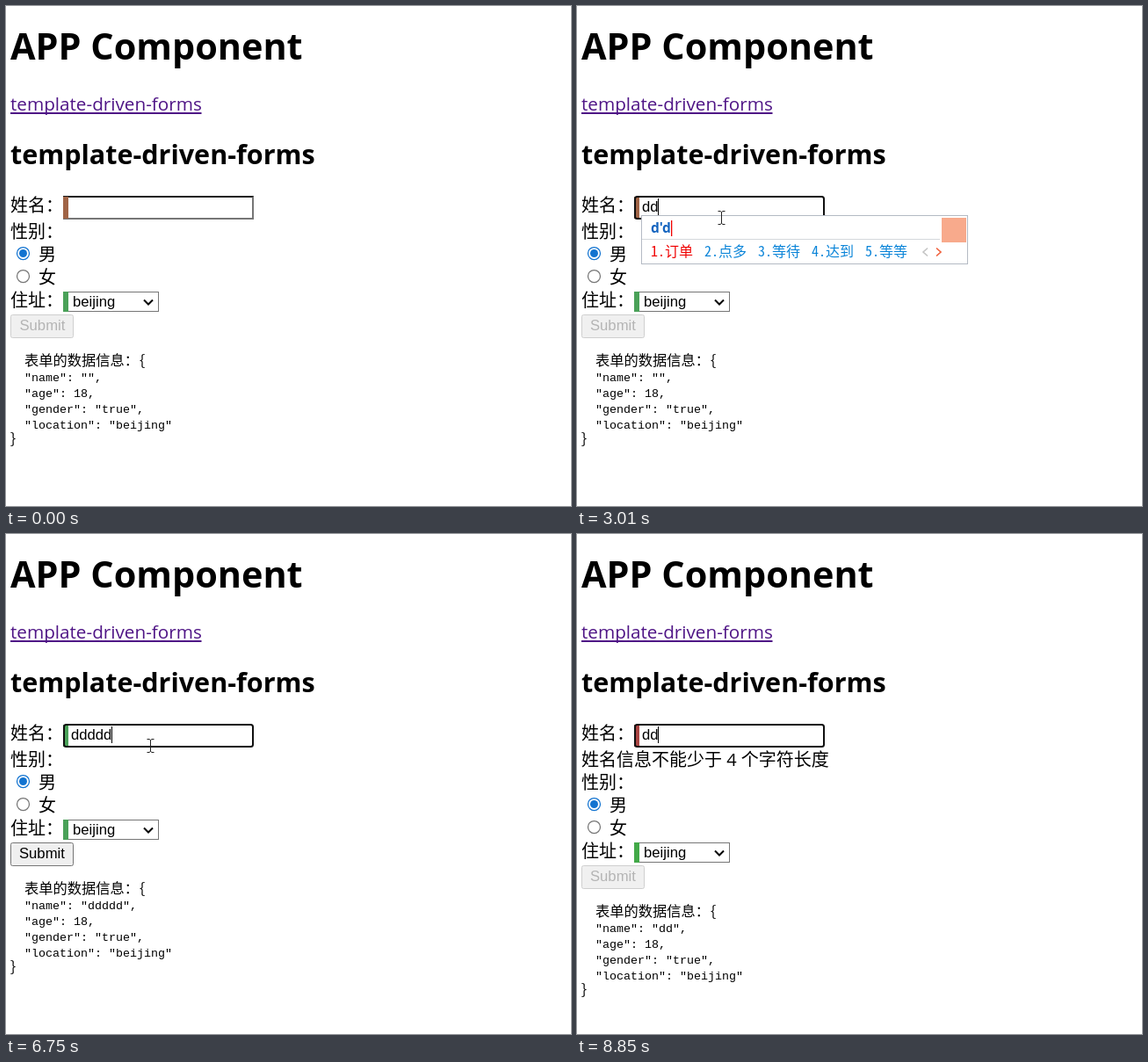
Write an HTML page that moves like this. It is 643 px wide and 569 px high and loops after 9.23 s.

```html
<!DOCTYPE html>
<html lang="zh-CN">
<head>
<meta charset="utf-8">
<title>APP Component</title>
<style>
html, body { margin: 0; width: 100%; height: 100%; overflow: hidden; background: #fff; }
svg { display: block; width: 643px; height: 569px; }
text { white-space: pre; fill: #000; }
.head { font-family: "Open Sans", "Noto Sans", sans-serif; font-weight: 700; }
.link { font: 20.7px "Open Sans", "Noto Sans", sans-serif; fill: #4f1586; }
.label { font: 20px "Open Sans", "Noto Sans CJK SC", "Noto Sans CJK", sans-serif; }
.field { font: 16.67px "Liberation Sans", Arial, sans-serif; }
.mono { font: 13.33px "Liberation Mono", monospace; }
.note { font: 16.25px "Noto Sans Mono CJK SC", "Noto Sans CJK SC", monospace; }
.pick { font: 16px "Noto Sans Mono CJK SC", "Noto Sans CJK SC", monospace; fill: #0a84d8; }
.pick:first-child { fill: #f00000; }
.pinyin { font: 700 15.5px "Open Sans", "Noto Sans", sans-serif; fill: #1464bf; }
.ring { fill: none; stroke-width: 1.25; }
</style>
</head>
<body>
<svg viewBox="0 0 643 569">
  <text class="head" x="5" y="61" font-size="41.4">APP Component</text>
  <text class="link" x="5" y="119">template-driven-forms</text>
  <rect x="5" y="121" width="217.500" height="2" fill="#4f1586"/>
  <text class="head" x="5" y="180" font-size="30.5">template-driven-forms</text>

  <text class="label" x="5" y="234">姓名：</text>
  <g id="idle">
    <path d="M65 216h217v27h-217z" fill="#767676"/>
    <path d="M65 216h217l-2 2h-215z" fill="#1c1c1c"/>
    <path d="M71 218h209v23h-209z" fill="#fff"/>
  </g>
  <rect id="bar" x="65" y="217" width="6" height="25"/>
  <rect id="ring" x="66" y="217" width="215" height="25" rx="2.5" fill="none" stroke="#101010" stroke-width="2"/>
  <text class="field" id="typed" x="74" y="234"></text>
  <rect id="caret" y="219" width="1" height="19"/>
  <text class="label" id="error" x="5" y="264">姓名信息不能少于 4 个字符长度</text>

  <g id="rest">
    <text class="label" x="5" y="264">性别：</text>
    <circle class="ring" cx="19.5" cy="281.5" r="7" stroke="#1273d0"/>
    <circle cx="19.5" cy="281.5" r="4.5" fill="#1273d0"/>
    <text class="label" x="37" y="290">男</text>
    <circle class="ring" cx="19.5" cy="307.5" r="7" stroke="#767676"/>
    <text class="label" x="37" y="316">女</text>
    <text class="label" x="5" y="342">住址：</text>
    <rect x="65.5" y="325.5" width="108" height="22" fill="none" stroke="#767676"/>
    <rect id="selectBar" x="65" y="325" width="6" height="23"/>
    <text class="field" x="76" y="342">beijing</text>
    <path d="M157 334.500l5 5l5-5" fill="none" stroke="#000" stroke-width="2"/>
    <rect id="button" x="5.5" y="351.5" width="71" height="26" rx="2"/>
    <text class="field" id="submit" x="15" y="369">Submit</text>
    <text class="note" x="21" y="409">表单的数据信息：{</text>
    <text class="mono" id="name" x="21" y="427"></text>
    <text class="mono" x="21" y="445">"age": 18,</text>
    <text class="mono" x="21" y="463">"gender": "true",</text>
    <text class="mono" x="21" y="481">"location": "beijing"</text>
    <text class="note" x="4" y="498">}</text>
  </g>

  <g id="ime">
    <rect id="panel" x="73.5" y="238.5" height="55" fill="#fff" stroke="#b4bac4"/>
    <rect id="rule" x="74" y="265" height="1" fill="#d5d8dc"/>
    <text class="pinyin" id="pinyin" x="84" y="258"></text>
    <rect id="redCaret" y="244" width="1.3" height="18" fill="#f00000"/>
    <g id="picks"></g>
    <g id="panelEnd" fill="none" stroke-width="1.6">
      <rect x="-30" y="241" width="28" height="28" fill="#f8aa8c"/>
      <path d="M-46 275.5l-5 4.5l5 4.5" stroke="#c4c4c4"/>
      <path d="M-36 275.5l5 4.5l-5 4.5" stroke="#f0603c"/>
    </g>
  </g>

  <path id="beam" d="M160.5 233.5h2.5l1.5 1l1.5-1h2.5M164.5 234.5v13M160.5 248.5h2.5l1.5-1l1.5 1h2.5" fill="none" stroke="#222"/>
  <path id="arrow" d="M.5.5v16l3.7-3.5l2.5 5.500l2.300-1l-2.500-5.400h5z" fill="#fff" stroke="#000"/>
</svg>
<script>
const LOOP = 9230;
const ui = {};
document.querySelectorAll('[id]').forEach(el => ui[el.id] = el);

// [start, characters typed, right edge of the candidate panel]
const typing = [[0, 0], [2860, 1, 437], [3010, 2, 445], [3160, 3, 525], [3560, 4, 637],
  [3860, 4], [5650, 5], [6890, 4], [7040, 3], [7220, 2]];
const caretOn = [[1140, 1690], [2160, 2690], [2860, 4410], [4960, 5420],
  [5650, 6180], [6750, 7300], [7780, 8310], [8850, LOOP]];
const words = ['', '的 到 都 对 等', '订单 点多 等待 达到 等等',
  '滴滴答 等等等 点点滴 达到的 对等的', '滴答滴答 的点点滴滴 地对地导弹 顶顶顶顶 点点滴滴'];

const set = (el, attrs) => { for (const k in attrs) el.setAttribute(k, attrs[k]); };
const show = (el, on) => { el.style.display = on ? '' : 'none'; };
const curve = (a, b, c, u) => a * (1 - u) ** 2 + 2 * b * u * (1 - u) + c * u * u;

function drawPanel(count, right) {
  show(ui.ime, right);
  if (!right) return;
  set(ui.panel, { width: right - 74 });
  set(ui.rule, { width: right - 106 });
  set(ui.panelEnd, { transform: `translate(${right})` });
  ui.pinyin.textContent = Array(count).fill('d').join("'");
  set(ui.redCaret, { x: 84 + Math.round(ui.pinyin.getComputedTextLength()) });
  let x = 84;
  ui.picks.innerHTML = words[count].split(' ').map((word, i) => {
    const item = `<text class="pick" x="${x}" y="285">${i + 1}.${word}</text>`;
    x += 29 + 16 * word.length;
    return item;
  }).join('');
}

function drawPointer(t) {
  let pos = null;
  if (t >= 140 && t < 990) {
    const u = Math.floor((t - 140) / 77.3) / 11;
    pos = [curve(217, 65, 164, u), curve(556, 380, 241, u)];
  } else if (t >= 8310 && t < 8690) {
    const u = (Math.floor((t - 8310) / 76) + 1) / 5;
    pos = [curve(164, 350, 43, u), curve(241, 330, 548, u)];
  }
  show(ui.arrow, pos);
  show(ui.beam, t >= 990 && t < 8310);
  if (pos) set(ui.arrow, { transform: `translate(${pos.map(Math.round)})` });
}

let last;
function draw(t) {
  const now = typing.findLast(s => t >= s[0]);
  const [, count, right] = now;
  const text = 'd'.repeat(count);
  const model = right ? '' : text;
  const valid = model.length > 3;
  const error = t >= 7040;
  const focus = t >= 1070;
  const green = error ? '#42a948' : '#4aa158';

  show(ui.idle, !focus);
  show(ui.ring, focus);
  show(ui.error, error);
  set(ui.bar, { fill: valid ? green : error ? '#a94442' : '#a06446' });
  set(ui.selectBar, { fill: green });
  set(ui.rest, { transform: `translate(0 ${error ? 26 : 0})` });
  set(ui.button, { fill: valid ? '#efefef' : '#f0f0f0', stroke: valid ? '#767676' : '#cfcfcf' });
  ui.submit.style.fill = valid ? '#000' : '#b4b4b4';
  set(ui.submit, { x: focus ? 15 : 15.5 });
  show(ui.caret, caretOn.some(([a, b]) => t >= a && t < b));
  set(ui.caret, { x: Math.floor(74 + count * 9.27) });
  if (now !== last) {
    ui.typed.textContent = text;
    ui.name.textContent = `"name": "${model}",`;
    drawPanel(count, right);
    last = now;
  }
  drawPointer(t);
}

function tick() {
  draw(performance.now() % LOOP);
  requestAnimationFrame(tick);
}
tick();
</script>
</body>
</html>
```
